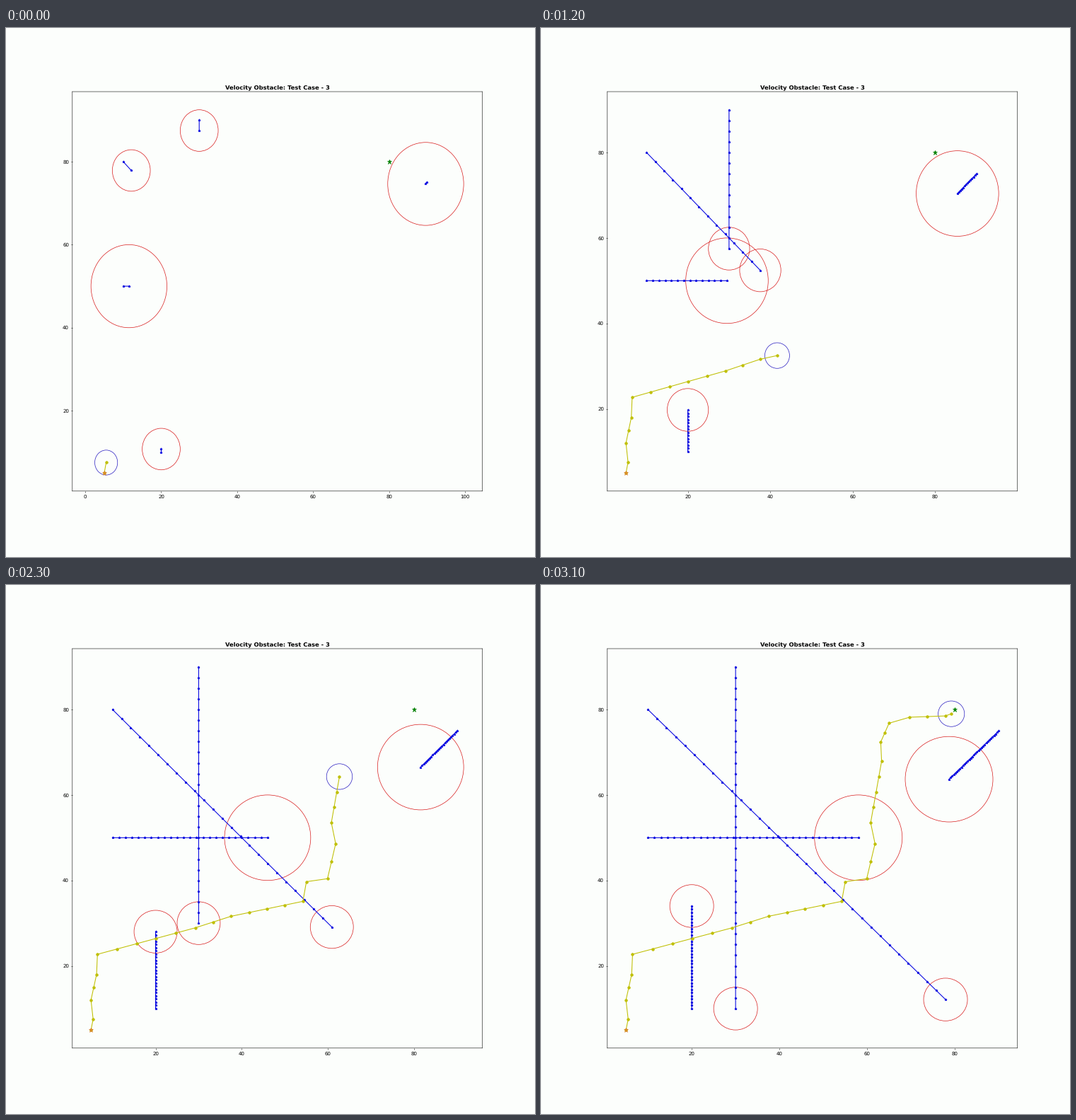
Animation, 748 px wide and 748 px high, one loop 3.2 s. Source, as a matplotlib script:

```python
import numpy as np
import matplotlib.pyplot as plt
from matplotlib.animation import FuncAnimation
from matplotlib.patches import Circle

SIZE, DPI = 748, 50
FRAMES, INTERVAL = 32, 100
MARGIN = 0.05
LEFT, RIGHT, TOP, BOTTOM = 93.8, 673.5, 90, 654.8

PAPER, RED, NAVY, BLUE = "#fcfefc", "#d81818", "#2418c0", "#0000e0"

plt.rcParams.update({"font.family": "DejaVu Sans", "text.hinting": "none",
                     "path.snap": False})

# start, velocity, radius
D = np.sqrt(0.5)
OBSTACLES = [
    ((30, 90), (0, -2.5), 5),
    ((10, 80), (3 * D, -3 * D), 5),
    ((10, 50), (1.5, 0), 10),
    ((90, 75), (-D / 2, -D / 2), 10),
    ((20, 10), (0, 0.75), 5),
]
START, GOAL = (5, 5), (80, 80)

# step: position at each turn of the robot, even steps in between
TURNS = {
    0: START, 1: (5.5, 7.5), 2: (5, 12), 4: (6.3, 18), 5: (6.5, 22.7),
    10: (29.2, 28.9), 12: (37.5, 31.6), 16: (54.2, 35.1), 17: (55, 39.7),
    18: (59.9, 40.4), 20: (61.8, 48.6), 21: (60.8, 53.5), 25: (63.3, 67.9),
    26: (63.1, 72.4), 28: (65, 76.8), 29: (69.7, 78.2), 31: (77.8, 78.5),
    32: (79.2, 79),
}
STEPS = np.arange(FRAMES + 1)
ROUTE = np.column_stack([np.interp(STEPS, list(TURNS), axis)
                         for axis in zip(*TURNS.values())])

fig = plt.figure(figsize=(SIZE / DPI, SIZE / DPI), dpi=DPI, facecolor=PAPER)
ax = fig.add_axes([LEFT / SIZE, 1 - BOTTOM / SIZE,
                   (RIGHT - LEFT) / SIZE, (BOTTOM - TOP) / SIZE],
                  facecolor=PAPER)
ax.set_title("Velocity Obstacle: Test Case - 3", fontsize=12, fontweight="bold")
ax.set_xticks(range(0, 101, 20))
ax.set_yticks(range(0, 101, 20))


def ring(radius, color):
    return ax.add_patch(Circle((0, 0), radius, fill=False, ec=color, lw=1))


def trail(color, marker, size):
    return ax.plot([], [], color=color, marker=marker, ms=size)[0]


rings = [ring(radius, RED) for *_, radius in OBSTACLES]
trails = [trail(BLUE, "*", 5) for _ in OBSTACLES]
robot = ring(3, NAVY)
robot_trail = trail("y", "o", 5.2)
ax.plot(*START, "*", ms=9, mfc="#e0a020", mec="#d87030", mew=0.8)
ax.plot(*GOAL, "g*", ms=9.5)


def padded(low, high):
    pad = MARGIN * (high - low)
    return low - pad, high + pad


def update(frame):
    n = frame + 1
    steps = STEPS[:n + 1, None]
    low, high = np.array([5.0, 5.0]), np.array([90.0, 90.0])
    for (start, velocity, radius), circle, line in zip(OBSTACLES, rings, trails):
        path = np.array(start) + steps * np.array(velocity)
        line.set_data(*path.T)
        circle.center = path[-1]
        low = np.minimum(low, path[-1] - radius)
        high = np.maximum(high, path[-1] + radius)
    robot_trail.set_data(*ROUTE[:n + 1].T)
    robot.center = ROUTE[n]
    ax.set_xlim(*padded(low[0], high[0]))
    ax.set_ylim(*padded(low[1], high[1]))
    return [*rings, *trails, robot, robot_trail]


anim = FuncAnimation(fig, update, frames=FRAMES, interval=INTERVAL,
                     init_func=lambda: update(0), repeat=True, repeat_delay=0)
plt.show()
```
